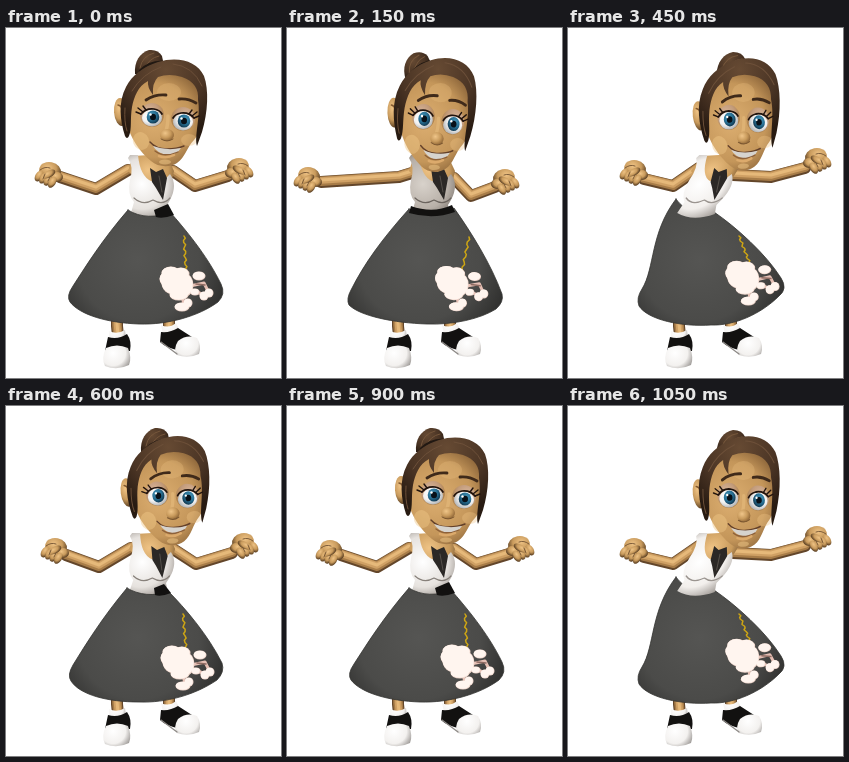
Animation of 275x350 px, one loop 1.2 s. Source, as an HTML page with a canvas:

```html
<!DOCTYPE html>
<html lang="en">
<head>
<meta charset="utf-8">
<title>Dancing girl in a poodle skirt</title>
<style>
html, body { margin: 0; width: 100%; height: 100%; overflow: hidden; background: #fff; }
canvas { display: block; }
</style>
</head>
<body>
<canvas id="stage" width="275" height="350"></canvas>
<script>
const ctx = document.getElementById('stage').getContext('2d');
const SKIN = ['#efc385', '#c89a5c', '#5f4325'];
const HAIR = ['#664a33', '#4a3424', '#281b12'];
const WHITE = ['#ffffff', '#f3f1ef', '#8f8b88'];
const BLACK = '#121110';
const CLOTH = ['#ffffff', '#e6e2de', '#87807a'];

// head: eye-line offset, tilt and scale; arms run shoulder, elbow, wrist; fists are centres
const center = {
  head: { x: 0, y: 0, tilt: 0, sx: 1, sy: 1 },
  tail: { x: 0, y: 0, tilt: 0 },
  torso: { x: 0, lean: 0, cloth: CLOTH },
  leftArm: [122, 142, 90, 161, 54, 149], leftFist: [42, 146],
  rightArm: [167, 143, 189, 158, 222, 148], rightFist: [234, 142],
  skirt: 'M122 182C134 190 151 190 164 184C178 200 201 227 215 256Q220 266 212 274C193 288 162 297 133 296C102 295 74 287 64 274Q60 268 67 258C80 238 96 212 122 182Z',
  belt: 'M148 182L162 176L168 187Q157 191 150 189Z',
  leash: [178, 208, 180, 243], poodle: [0, 0, 0]
};
const left = {
  head: { x: -10.5, y: 2.5, tilt: .03, sx: .95, sy: 1.07 },
  tail: { x: -14, y: 3, tilt: -.25 },
  torso: { x: 0, lean: 0, cloth: ['#d8d2cb', '#b8b0a8', '#6a635d'] },
  leftArm: [125, 145, 112, 149, 34, 154], leftFist: [20, 151],
  rightArm: [167, 150, 184, 168, 208, 159], rightFist: [219, 153],
  skirt: 'M122 181C136 188 154 187 167 180C184 204 204 236 215 266Q217 274 209 281C193 291 166 297 140 296C107 295 73 288 62 277Q59 271 64 262C77 236 95 211 122 181Z',
  belt: 'M124 178Q146 186 165 177L168 184Q146 192 122 185Z',
  leash: [182, 209, 174, 249], poodle: [-6, 0, .04]
};
const right = {
  head: { x: 5, y: 0, tilt: -.06, sx: .96, sy: 1.02 },
  tail: { x: 6, y: 0, tilt: 0 },
  torso: { x: 2, lean: -.06, cloth: CLOTH },
  leftArm: [125, 142, 93, 161, 60, 149], leftFist: [48, 144],
  rightArm: [167, 143, 190, 158, 226, 147], rightFist: [239, 139],
  skirt: 'M121 182C132 189 149 191 162 185C179 202 202 229 216 257Q219 266 211 274C189 289 160 297 133 296C102 296 74 289 65 275Q61 269 67 259C80 238 96 212 121 182Z',
  belt: 'M148 182L158 178L165 187Q155 191 149 189Z',
  leash: [177, 208, 180, 243], poodle: [1, 1, 0]
};
const farRight = {
  head: { x: 14, y: 2, tilt: -.05, sx: .94, sy: 1.05 },
  tail: { x: 21, y: 2, tilt: .1 },
  torso: { x: 7, lean: -.4, cloth: ['#ffffff', '#f2efec', '#9a948f'] },
  leftArm: [131, 140, 105, 158, 76, 151], leftFist: [65, 144],
  rightArm: [165, 147, 203, 149, 237, 140], rightFist: [250, 132],
  skirt: 'M108 171C117 184 134 188 146 184C168 199 198 226 213 250Q220 261 211 268C193 286 166 298 143 297C114 299 80 292 71 278Q68 270 74 261C87 240 82 205 108 171Z',
  leash: [171, 208, 182, 236], poodle: [4, -6, -.02]
};
const DANCE = [center, left, right, farRight, right, { ...left, blink: true }, center, farRight];
const BEAT = 150;

function at(x, y, angle, draw, sx = 1, sy = 1) {
  ctx.save();
  ctx.translate(x, y);
  ctx.rotate(angle);
  ctx.scale(sx, sy);
  draw();
  ctx.restore();
}
function glow(x, y, r, [light, mid, dark]) {
  const g = ctx.createRadialGradient(x, y, 0, x, y, r);
  g.addColorStop(0, light);
  g.addColorStop(.6, mid);
  g.addColorStop(1, dark);
  return g;
}
function shape(d, fill) {
  ctx.fillStyle = fill;
  ctx.fill(new Path2D(d));
}
function line(d, color, width) {
  ctx.strokeStyle = color;
  ctx.lineWidth = width;
  ctx.stroke(new Path2D(d));
}
function ball(x, y, rx, ry, tones, angle = 0) {
  at(x, y, angle, () => {
    ctx.fillStyle = Array.isArray(tones) ? glow(-.25, -.3, 1.3, tones) : tones;
    ctx.beginPath();
    ctx.arc(0, 0, 1, 0, 7);
    ctx.fill();
  }, rx, ry);
}

function limb([x1, y1, x2, y2, x3, y3], width) {
  const path = `M${x1} ${y1}Q${(x1 + x2 * 3) / 4} ${(y1 + y2 * 3) / 4} ${x2} ${y2}L${x3} ${y3}`;
  [['#63462a', 1, 0], ['#a77c48', .8, -.8], ['#cfa064', .55, -1.5], ['#e6b97a', .25, -2]]
    .forEach(([color, scale, lift]) => at(0, lift, 0, () => line(path, color, width * scale)));
}

function fist([x, y], side) {
  at(x, y, 0, () => {
    ball(2, -3, 11, 9, SKIN, .2);
    ball(9, 3, 6, 5, SKIN);
    for (let i = 0; i < 4; i++) ball(-9 + i * 4.4, 2 + i * 2.1, 3.6, 6, SKIN, .55);
    ball(1, 0, 7, 3.5, SKIN, -.5);
    line('M-8 -4Q-3 -8 2 -6M-5 5L-3 0M0 7L2 3', '#63462a', .8);
  }, side, 1);
}

function legs() {
  limb([111, 285, 111, 298, 112, 308], 12);
  limb([164, 282, 163, 290, 163, 300], 12);
  shape('M103 303Q111 307 119 302L120 310L103 312Z', glow(108, 303, 15, WHITE));
  shape('M102 309Q112 312 121 306Q126 313 124 323L99 323Z', BLACK);
  shape('M100 320Q111 315 122 320Q126 330 123 337Q111 343 99 338Q95 330 100 320Z', glow(107, 325, 21, WHITE));
  shape('M155 297Q163 301 170 295L173 302L157 306Z', glow(162, 297, 15, WHITE));
  shape('M155 304Q164 305 172 300L186 309L175 323Q160 320 154 314Z', BLACK);
  shape('M172 313Q181 306 191 310Q196 318 193 326Q182 331 171 327Q167 321 172 313Z', glow(180, 315, 20, WHITE));
  line('M155 314Q163 320 171 326', '#8b8784', 1.2);
}

function torso({ x, lean, cloth }) {
  ctx.save();
  ctx.transform(1, 0, lean, 1, x - lean * 128, 0);
  shape('M127 128L160 126L168 143L165 156L139 160L122 143Z', glow(142, 142, 34, SKIN));
  shape('M124 127L132 127Q134 148 145 153Q156 156 164 146Q172 157 164 172L161 177L163 186Q144 194 125 185L128 174Q121 166 124 152Q128 139 122 130Z', glow(136, 156, 42, cloth));
  line('M128 170Q137 178 147 172Q157 178 164 170', cloth[2], 1.2);
  shape('M144 140L150 144L157 141L161 150L157 172L150 160L146 154Z', '#2b2826');
  line('M153 148L156 164', '#55504b', 1);
  ctx.restore();
}

function leash([x1, y1, x2, y2]) {
  let path = `M${x1} ${y1}`;
  for (let i = 1; i <= 16; i++) {
    const t = i / 16;
    path += `L${x1 + (x2 - x1) * t + 1.2 * Math.sin(i * 1.9)} ${y1 + (y2 - y1) * t}`;
  }
  line(path, '#cda514', 1.5);
}

function poodle([x, y, angle]) {
  const puffs = [
    [161, 251, 7, 7], [165, 245, 9, 6], [175, 246, 8, 6], [168, 255, 12, 11],
    [179, 257, 8, 11], [173, 267, 9, 5], [176, 279, 7, 4], [182, 275, 4, 4],
    [189, 264, 4, 3], [198, 268, 4, 4], [203, 265, 4, 4], [193, 248, 6, 4]
  ];
  at(180 + x, 262 + y, angle, () => {
    ctx.translate(-180, -262);
    line('M184 258L198 255L202 263M176 266L178 278M184 261L198 267', '#e5bfb4', 3);
    line('M190 256L199 257', '#8e6b62', 1.5);
    puffs.forEach(([px, py, rx, ry]) => ball(px, py, rx + .5, ry + .5, '#efd6cc'));
    puffs.forEach(([px, py, rx, ry]) => ball(px - .3, py - .3, rx, ry, '#fff5ef'));
  });
}

function skirt(pose) {
  shape(pose.skirt, glow(132, 232, 102, ['#555553', '#4b4b49', '#282827']));
  line(pose.skirt, '#343432', .8);
  if (pose.belt) shape(pose.belt, BLACK);
  leash(pose.leash);
  poodle(pose.poodle);
}

function ponytail({ x, y, tilt }) {
  at(143 + x, 32 + y, tilt, () => {
    shape('M-14 14C-15 1 -9 -7 0 -10Q9 -11 13 -4L15 6L-6 14Z', glow(-3, -3, 20, HAIR));
    line('M-9 8Q-7 -4 5 -7M-4 8Q0 -2 10 -4', '#75563b', 1);
    line('M-9 11Q-1 2 13 2', '#211812', 2.5);
  });
}

function eye(x, y, side, blink) {
  at(x, y, 0, () => {
    ball(0, -2, 12, 12, ['#d8b59a', '#c39c7c', '#b0844f']);
    if (blink) {
      ball(0, -3, 12, 9, ['#dfbdb2', '#caa294', '#ad7c61']);
      line('M-12 3Q0 10 12 3', '#20130d', 2);
      line('M-11 4L-15 7M-8 6L-11 10M-4 7L-6 11', '#20130d', 1.4);
      return;
    }
    ball(0, 1, 10, 8.5, ['#ffffff', '#f2f2f2', '#b9bbbd']);
    ball(side, 0, 6.3, 6.6, ['#4795b8', '#286f93', '#123c55']);
    ball(side, 0, 3, 3.2, '#081018');
    ball(-1.5 * side, -2.5, 1.2, 1.2, '#fff');
    line('M-11 -3Q-6 -9 2 -8Q8 -7 10 -3', '#20130d', 1.7);
    line('M-11 -3L-16 -5M-9 -5L-14 -9M-6 -7L-9 -11', '#20130d', 1.4);
  }, side, 1);
}

function head({ x, y, tilt, sx, sy }, blink) {
  at(161 + x, 92 + y, tilt, () => {
    ctx.translate(-161, -92);
    ball(115, 84, 7, 14, SKIN, -.08);
    line('M112 77Q118 78 116 90', '#80582f', 1.5);
    shape('M122 75C128 50 146 42 166 42C184 42 194 56 196 76C198 94 195 104 188 112C181 119 179 130 171 135C163 140 152 139 145 133C134 124 124 110 121 95Z', glow(148, 92, 62, ['#dcae70', '#c4965a', '#76522d']));
    ball(135, 113, 8, 9, 'rgba(240,199,135,.45)', -.4);
    ball(183, 112, 8, 6, 'rgba(240,199,135,.35)');
    ball(163, 64, 12, 9, 'rgba(235,192,128,.3)');
    shape('M119 108C114 92 112 74 120 59C126 47 137 39 152 34C172 28 191 33 198 48C203 62 202 84 196 104L191 118C188 108 195 88 192 72C193 61 188 53 176 49Q163 45 152 49Q146 55 147 67Q141 59 142 53C132 58 128 69 126 79C124 91 126 101 123 108Q121 112 119 108Z', glow(160, 42, 66, HAIR));
    line('M126 63Q136 46 155 39M167 36Q187 38 196 58M119 80Q118 94 121 103', '#6d5039', 1);
    line('M140 72Q149 66 160 67M173 71Q182 70 190 75', '#3f2a1a', 2.8);
    eye(146, 89, 1, blink);
    eye(177, 93, -1, blink);
    line('M162 88Q162 99 159 105', '#deb274', 3.5);
    ball(161, 107, 7, 6, ['#efc589', '#c89a5c', '#966c3b']);
    line('M155 111Q161 115 167 111', '#7a5630', 1);
    line('M144 114Q150 121 161 121Q171 121 178 118', '#63402a', 1.4);
    shape('M147 118Q160 123 175 120Q171 127 161 127Q151 125 147 118Z', '#d6d3ce');
    line('M149 123Q158 130 172 124', '#8e613a', 1.3);
    line('M153 128Q160 131 168 127', '#dcaa6c', 2.5);
    ball(159, 134, 6, 2.5, 'rgba(240,199,135,.5)');
  }, sx, sy);
}

function girl(pose) {
  ctx.fillStyle = '#fff';
  ctx.fillRect(0, 0, 275, 350);
  legs();
  limb(pose.leftArm, 12);
  limb(pose.rightArm, 12);
  fist(pose.leftFist, 1);
  fist(pose.rightFist, -1);
  if (pose.belt) { torso(pose.torso); skirt(pose); }
  else { skirt(pose); torso(pose.torso); }
  ponytail(pose.tail);
  head(pose.head, pose.blink);
}

ctx.lineCap = ctx.lineJoin = 'round';
function play() {
  girl(DANCE[Math.floor(performance.now() / BEAT) % DANCE.length]);
  requestAnimationFrame(play);
}
play();
</script>
</body>
</html>
```
